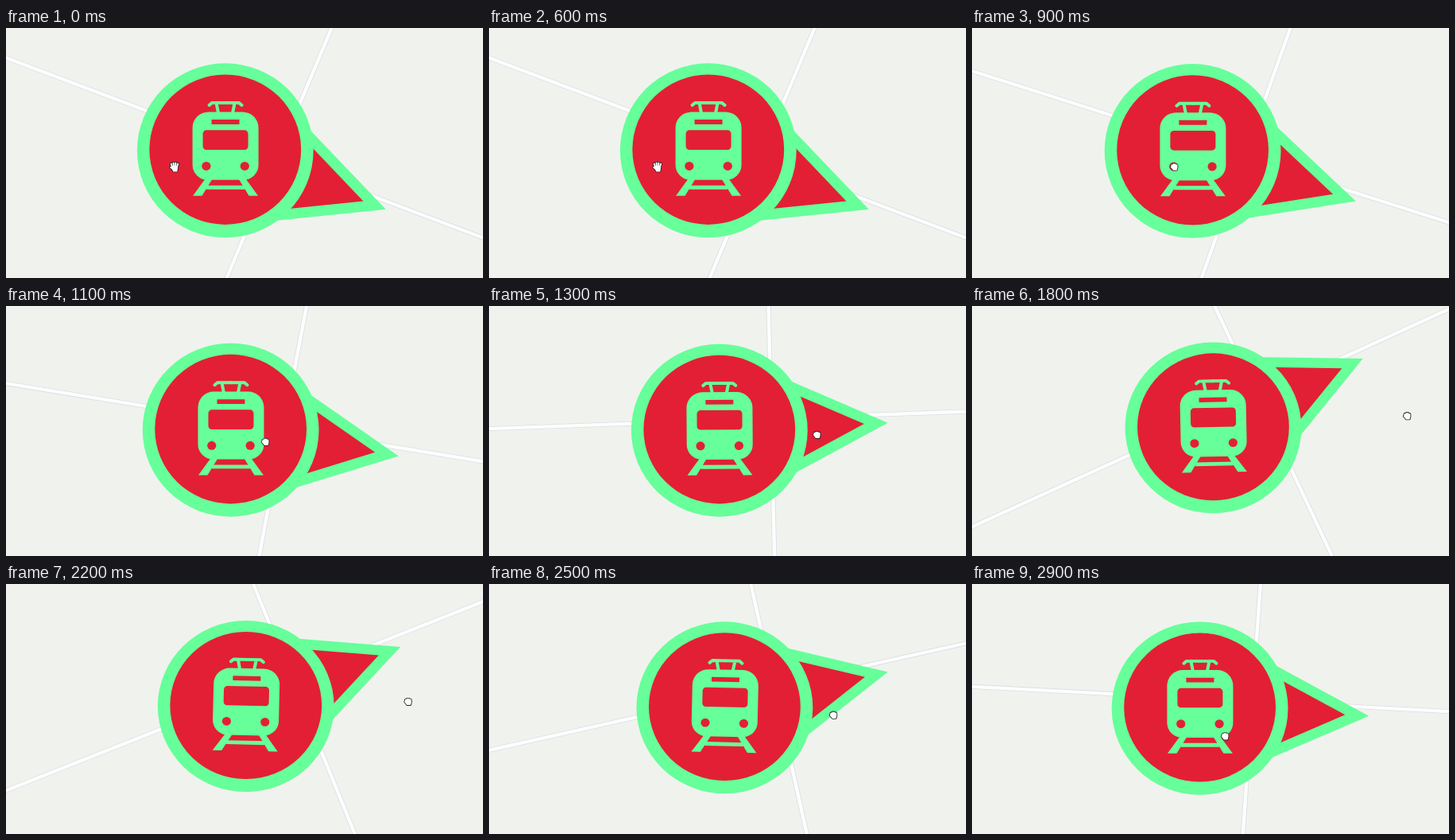
Write an HTML page with a canvas that moves like this. It is 600 px wide and 314 px high and loops after 3000 ms.

```html
<!DOCTYPE html>
<html lang="en">
<head>
<meta charset="utf-8">
<title>Rotating map with a tram marker</title>
<style>
  html, body { margin: 0; width: 100%; height: 100%; overflow: hidden; background: #f0f2ee; }
  canvas { display: block; }
</style>
</head>
<body>
<canvas id="stage" width="600" height="314"></canvas>
<script>
const ctx = document.getElementById('stage').getContext('2d');
const GREEN = '#66ff99', RED = '#e31f35', LAND = '#f0f2ee';
const LOOP = 3000, STEP = 100;
const DRAG_START = 620, DRAG_END = 1830, RETURN_START = 1785, RETURN_END = 3585;
const MAP_LAG = 80;
const RAD = Math.PI / 180;

function ease(t, from, to) {
  const u = Math.min(1, Math.max(0, (t - from) / (to - from)));
  return (1 - Math.cos(Math.PI * u)) / 2;
}

const dragOut = t => ease(t, DRAG_START, DRAG_END);
const dragBack = t => ease(t, RETURN_START, RETURN_END);

// The map follows the cursor a moment later
const bearingAt = t => 21.3 - 47.5 * (dragOut(t - MAP_LAG) - dragBack(t - MAP_LAG));

// The marker sways with the turning speed once the tail points upwards
function swayAt(t) {
  const speed = (bearingAt(t + 5) - bearingAt(t - 5)) / 10;
  return -2.6 * speed * Math.min(0, bearingAt(t));
}

function fill(color, path) {
  ctx.fillStyle = color;
  ctx.beginPath();
  path();
  ctx.fill();
}

function stroke(color, width, path) {
  ctx.strokeStyle = color;
  ctx.lineWidth = width;
  ctx.beginPath();
  path();
  ctx.stroke();
}

const disc = (color, x, y, r) => fill(color, () => ctx.arc(x, y, r, 0, 7));
const box = (color, x, y, w, h, r) => fill(color, () => ctx.roundRect(x, y, w, h, r));

function line(...points) {
  ctx.moveTo(points[0], points[1]);
  for (let i = 2; i < points.length; i += 2) ctx.lineTo(points[i], points[i + 1]);
}

function drawRoads(bearing) {
  const roads = () => {
    const skew = Math.tan(0.8 * RAD) * 700;
    line(-700, 25.6, 700, 25.6);
    line(65.7 + skew, -674, 65.7 - skew, 726);
  };
  ctx.save();
  ctx.translate(287.2, 118.6);
  ctx.scale(1.017, 0.983);
  ctx.rotate(bearing * RAD);
  stroke('#dddde1', 6, roads);
  stroke('#fdfdfe', 4.4, roads);
  ctx.restore();
}

function drawTail(bearing, sway) {
  const wedge = (color, tip, base) => fill(color, () => {
    const half = (tip - base) * Math.tan(26.3 * RAD);
    line(tip, 0, base, -half, base, half);
  });
  const size = 1 + bearing * 0.0007;
  ctx.save();
  ctx.rotate((bearing * 0.975 - 0.4 + sway * 0.4) * RAD);
  ctx.scale(size, size);
  wedge(GREEN, 212.3, 50);
  wedge(RED, 182.5, 60);
  ctx.restore();
}

function drawTram(sway) {
  ctx.save();
  ctx.translate(0.3, -0.5);
  ctx.rotate(sway * RAD);
  ctx.lineCap = ctx.lineJoin = 'round';
  box(GREEN, -41.5, -48.5, 83, 86.5, [20, 20, 19, 19]);
  box(RED, -17.5, -38.7, 35, 6, 0.5);
  box(RED, -28.5, -25.3, 57, 25, 4.5);
  fill(GREEN, () => ctx.rect(-24, 45, 48, 5));
  for (const side of [-1, 1]) {
    stroke(GREEN, 4, () => {
      line(0, -60, side * 17, -60, side * 20.5, -57);
      line(side * 11.5, -60, side * 9, -47);
    });
    disc(RED, side * 24.2, 20.4, 5.6);
    fill(GREEN, () => line(side * 25, 36, side * 16, 36, side * 29.5, 58.2, side * 41, 58.2));
  }
  ctx.restore();
}

function drawMarker(bearing, sway) {
  const a = bearing * RAD;
  ctx.save();
  ctx.translate(288.5 - 35 * Math.sin(a), 121.2 + 35 * Math.cos(a));
  ctx.scale(1, 0.979 + bearing * 0.0004);
  drawTail(bearing, sway);
  disc(GREEN, 0, 0, 110.9);
  disc(RED, 0, -1.1, 95.4);
  drawTram(sway);
  ctx.restore();
}

function drawHand(x, y, grabbing) {
  const reach = grabbing ? 1.8 : 4, palm = grabbing ? 3.8 : 5;
  const hand = () => {
    for (let i = -1.5; i <= 1.5; i++) {
      const spread = grabbing ? 0 : i * 0.8;
      const top = -1 - reach + 0.5 * i * i;
      line(i * 2, 0, i * 2 + spread, top);
    }
    line(-1.6, 2.6, -2.8 - reach / 2, 0.7);
    line(-3, 0, 3.2, 0, 2.5, palm, -1, palm, -3, 1);
  };
  ctx.save();
  ctx.translate(x, y);
  ctx.lineCap = ctx.lineJoin = 'round';
  stroke('#222', 3.7, hand);
  stroke('#fff', 2, hand);
  fill('#fff', hand);
  ctx.restore();
}

function draw(t) {
  const bearing = bearingAt(t), out = dragOut(t), back = dragBack(t);
  ctx.fillStyle = LAND;
  ctx.fillRect(0, 0, 600, 314);
  drawRoads(bearing);
  drawMarker(bearing, swayAt(t));
  drawHand(212 + 336 * (out - back), 174.5 - 37 * out * out + 78 * back, t > DRAG_START);
}

const start = performance.now();
function tick() {
  const t = (performance.now() - start) % LOOP;
  draw(Math.floor(t / STEP) * STEP);
  requestAnimationFrame(tick);
}
tick();
</script>
</body>
</html>
```
